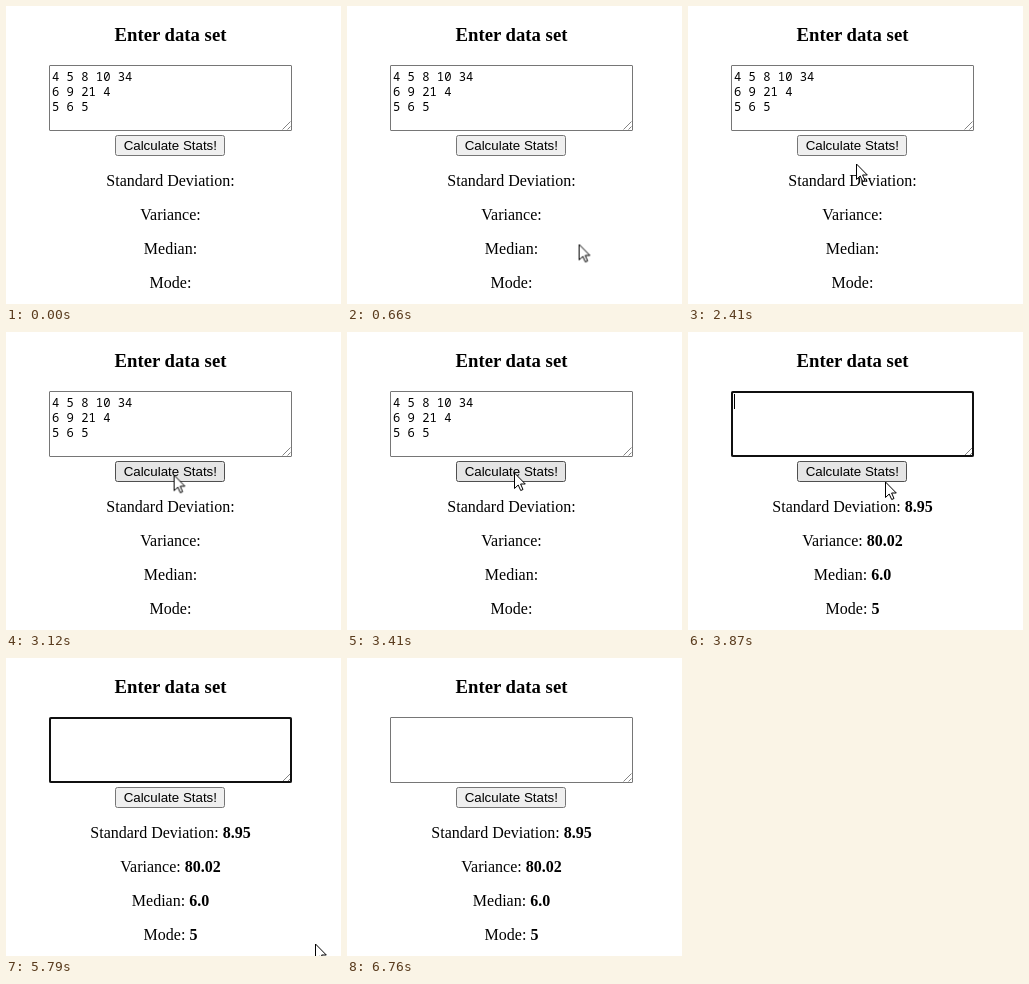
An HTML page that plays this animation: 335x298 px, repeating every 6.81 s.

```html
<!DOCTYPE html>
<html lang="en">
<head>
<meta charset="utf-8">
<title>Data set statistics</title>
<style>
html, body { margin: 0; width: 100%; height: 100%; overflow: hidden; background: #fff; }
svg { display: block; width: 335px; height: 298px; }
text { font: 16px "Liberation Serif", "Times New Roman", serif; text-anchor: middle; white-space: pre; }
.bold { font-weight: bold; }
.title { font-size: 18.72px; font-weight: bold; }
.data text { font: 12.2px "Noto Sans Mono", monospace; text-anchor: start; }
.label { font: 13.333px "Liberation Sans", Arial, sans-serif; }
.box { fill: #fff; stroke: #767676; }
.ring { fill: none; stroke: #101010; stroke-width: 2; }
.grip { fill: none; stroke: #767676; stroke-width: .9; }
.button { fill: #efefef; stroke: #767676; }
.pointer { fill: #fff; stroke: #000; stroke-linejoin: miter; }

.before, .after, .focus, .caret, .button { animation: 6810ms step-end infinite; }
.before { animation-name: before; }
.after { animation-name: after; }
.focus { animation-name: focus; }
.caret { animation-name: caret; }
.button { animation-name: hover; }
.pointer { animation: travel 6810ms infinite; }

@keyframes before { 0% { opacity: 1 } 51.83%, 100% { opacity: 0 } }
@keyframes after { 0% { opacity: 0 } 51.83%, 100% { opacity: 1 } }
@keyframes focus { 0% { opacity: 0 } 51.83% { opacity: 1 } 99.26%, 100% { opacity: 0 } }
@keyframes caret {
  0% { opacity: 0 }
  51.83% { opacity: 1 }
  76.5% { opacity: 0 }
  95.59% { opacity: 1 }
  99.26%, 100% { opacity: 0 }
}
@keyframes hover {
  0% { fill: #efefef; stroke: #767676 }
  40.23% { fill: #e5e5e5; stroke: #4f4f4f }
  57.56%, 100% { fill: #efefef; stroke: #767676 }
}
/* The pointer moves in small jumps, as in a screen recording. */
@keyframes travel {
  0% { transform: translate(302px, 302px); animation-timing-function: steps(1, start) }
  1.17% { transform: translate(302px, 302px); animation-timing-function: steps(6, start) }
  6.78% { transform: translate(254px, 259px); animation-timing-function: steps(5, start) }
  11.45% { transform: translate(226px, 232px); animation-timing-function: steps(7, start) }
  18.2% { transform: translate(206px, 204px); animation-timing-function: steps(1, start) }
  19.67% { transform: translate(203px, 200px); animation-timing-function: steps(3, start) }
  21.73% { transform: translate(189px, 185px); animation-timing-function: steps(11, start) }
  33.18% { transform: translate(170px, 159px); animation-timing-function: steps(3, start) }
  35.38% { transform: translate(169px, 158px); animation-timing-function: steps(1, start) }
  36.85% { transform: translate(168px, 157px); animation-timing-function: steps(8, start) }
  43.61% { transform: translate(168px, 143px); animation-timing-function: steps(8, start) }
  50.07% { transform: translate(167px, 141px); animation-timing-function: steps(1, start) }
  51.54% { transform: translate(167px, 140px); animation-timing-function: steps(1, start) }
  54.77% { transform: translate(167px, 140px); animation-timing-function: steps(3, start) }
  57.56% { transform: translate(197px, 149px); animation-timing-function: steps(3, start) }
  60.64% { transform: translate(245px, 172px); animation-timing-function: steps(5, start) }
  66.22% { transform: translate(280px, 207px); animation-timing-function: steps(2, start) }
  67.98% { transform: translate(285px, 215px); animation-timing-function: steps(1, start) }
  69.45% { transform: translate(287px, 219px); animation-timing-function: steps(7, start) }
  76.5% { transform: translate(303px, 257px); animation-timing-function: steps(9, start) }
  85.02% { transform: translate(309px, 283px); animation-timing-function: steps(1, start) }
  85.31% { transform: translate(309px, 285px); animation-timing-function: steps(1, start) }
  86.78% { transform: translate(310px, 287px); animation-timing-function: steps(3, start) }
  90.01% { transform: translate(311px, 296px); animation-timing-function: steps(1, start) }
  100% { transform: translate(302px, 302px) }
}
</style>
</head>
<body>
<svg viewBox="0 0 335 298">
  <text class="title" x="164.5" y="35">Enter data set</text>

  <rect class="box" x="43.5" y="59.5" width="242" height="65" rx=".5"/>
  <path class="grip" d="M276.5 123.5l8-8M281.5 123.5l3-3"/>
  <g class="before data">
    <text x="46" y="75">4 5 8 10 34</text>
    <text x="46" y="90">6 9 21 4</text>
    <text x="46" y="105">5 6 5</text>
  </g>
  <rect class="focus ring" x="44" y="60" width="241" height="64" rx="1.5"/>
  <rect class="caret" x="46" y="62" width="1" height="15"/>

  <rect class="button" x="109.5" y="129.5" width="109" height="20" rx="2"/>
  <text class="label" x="164.3" y="144">Calculate Stats!</text>

  <g class="before">
    <text x="164.5" y="180">Standard Deviation:</text>
    <text x="164.5" y="214">Variance:</text>
    <text x="164.5" y="248">Median:</text>
    <text x="164.5" y="282">Mode:</text>
  </g>
  <g class="after">
    <text x="164.5" y="180">Standard Deviation: <tspan class="bold">8.95</tspan></text>
    <text x="164.5" y="214">Variance: <tspan class="bold">80.02</tspan></text>
    <text x="164.5" y="248">Median: <tspan class="bold">6.0</tspan></text>
    <text x="164.5" y="282">Mode: <tspan class="bold">5</tspan></text>
  </g>

  <path class="pointer" d="M.5 1V16.5L4.2 13 6.7 18.5 9 17.5 6.6 12H11.3Z"/>
</svg>
</body>
</html>
```
